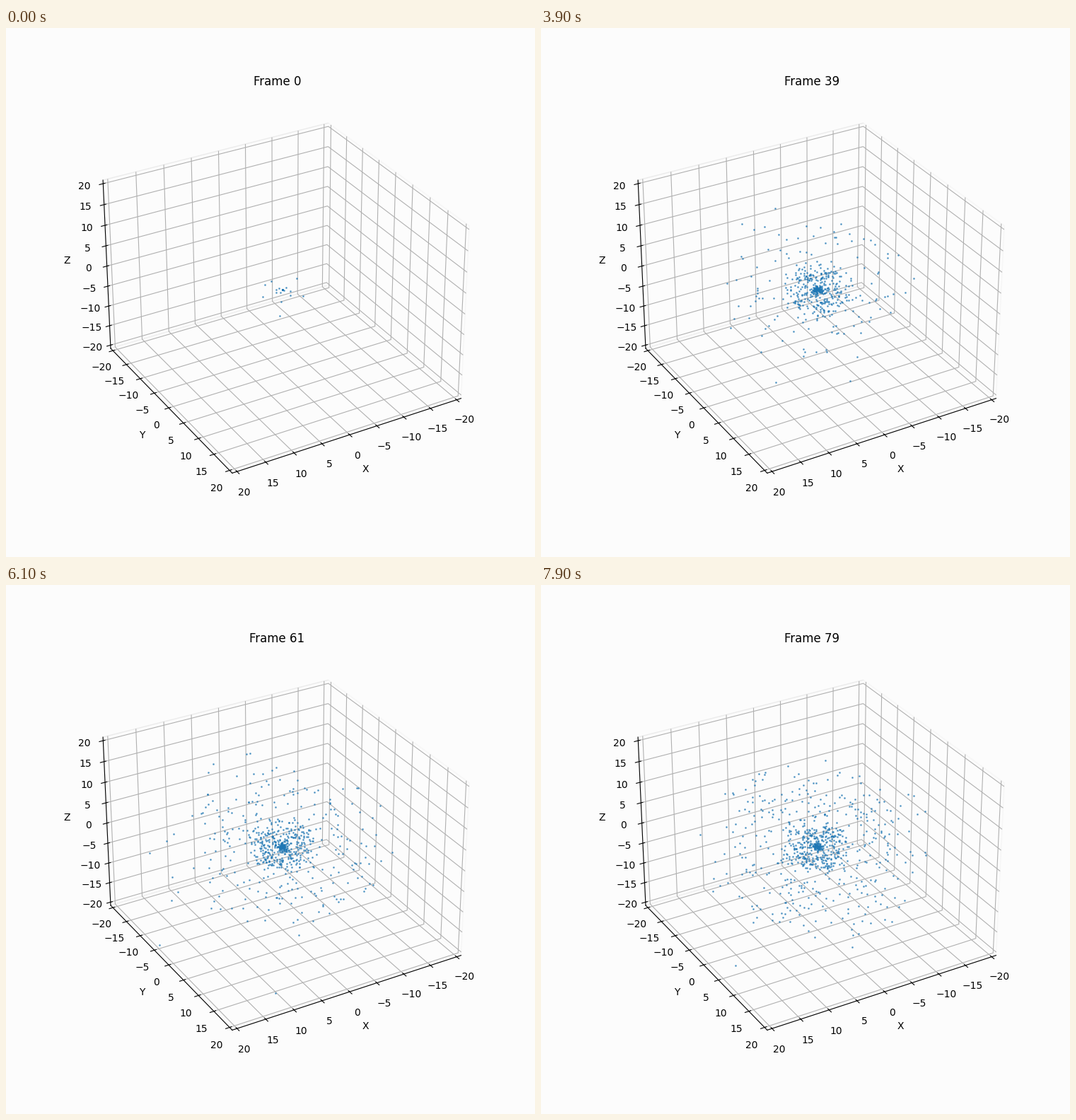
A matplotlib script for the animation above (8000 ms loop, 748 by 748 pixels).

```python
import numpy as np
import matplotlib.pyplot as plt
from matplotlib.animation import FuncAnimation

FRAMES = 80
WALKERS = 1000
STEP = 2.0
LIMIT = 20 * 25 / 24  # axis range with a small margin past the last tick
PAPER = "#fcfcfc"


def density(pos):
    """Unnormalised 3s hydrogen probability density, in Bohr radii."""
    r = np.linalg.norm(pos, axis=1)
    return (27 - 18 * r + 2 * r**2) ** 2 * np.exp(-2 * r / 3)


def walk(seed=3):
    """Metropolis walkers released at the nucleus, one sweep per frame."""
    rng = np.random.default_rng(seed)
    pos = np.zeros((WALKERS, 3))
    for _ in range(FRAMES):
        trial = pos + rng.normal(0, STEP, pos.shape)
        accept = rng.random(WALKERS) * density(pos) < density(trial)
        pos = np.where(accept[:, None], trial, pos)
        yield pos


path = list(walk())

fig = plt.figure(figsize=(7.48, 7.48), dpi=100, facecolor=PAPER)
ax = fig.add_subplot(projection="3d", facecolor=PAPER)
ax.view_init(elev=30, azim=60)

cloud, = ax.plot(*path[0].T, "o", color="C0", markersize=1, alpha=0.6)
title = ax.set_title("Frame 0")

ax.set(xlim=(-LIMIT, LIMIT), ylim=(-LIMIT, LIMIT), zlim=(-LIMIT, LIMIT),
       xlabel="X", ylabel="Y", zlabel="Z")
ticks = np.arange(-20, 21, 5)
for axis, edge in ((ax.xaxis, "#f6f6f6"), (ax.yaxis, "#ebebeb"),
                   (ax.zaxis, "#f0f0f0")):
    axis.set_ticks(ticks)
    axis.set_pane_color(PAPER)
    axis.pane.set_edgecolor(edge)


def update(i):
    cloud.set_data_3d(*path[i].T)
    title.set_text(f"Frame {i}")
    return cloud, title


anim = FuncAnimation(fig, update, frames=FRAMES, interval=100,
                     repeat=True, repeat_delay=0)
plt.show()
```
